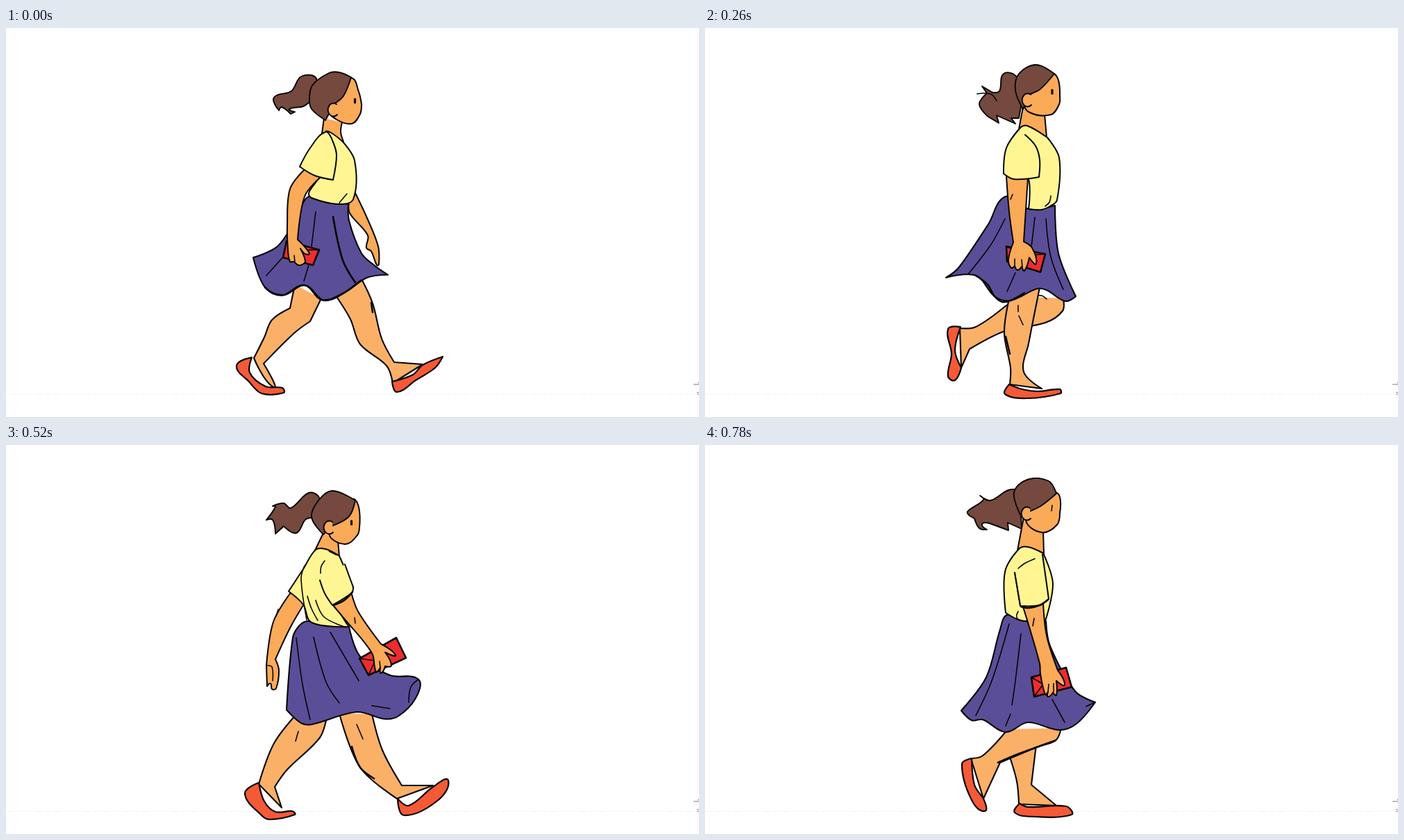
Write an HTML page that moves like this. It is 998 px wide and 561 px high and loops after 0.91 s.

```html
<!DOCTYPE html>
<html lang="en">
<head>
<meta charset="utf-8">
<title>Walk cycle</title>
<style>
  html, body { margin: 0; width: 100%; height: 100%; overflow: hidden; background: #fff; }
  svg { display: block; width: 100vw; height: 100vh; }
  path { stroke: #050505; stroke-linecap: round; stroke-linejoin: round; }
</style>
</head>
<body>
<svg id="stage" viewBox="0 0 998 561">
  <path d="M0 528.5H998" style="stroke:#f3f3f3;stroke-width:1;stroke-dasharray:9 5"/>
  <path d="M990.5 514H998M997 511.5h1M995.5 525.5h1.5M996 528h2" style="stroke:#777;stroke-width:1"/>
</svg>
<script>
const STEP = 130;
const SKIN = '#fbaa57';
let markup = '';

function path(d, fill, width) {
  markup += `<path d="${d}" fill="${fill}" stroke-width="${width}"/>`;
}

// Smooth curve through the points; "!" marks a sharp corner.
function curve(text, closed) {
  const pts = text.split(' ').map(p => {
    const [x, y] = p.split(',').map(parseFloat);
    return { x, y, sharp: p.endsWith('!') };
  });
  const n = pts.length, at = i => pts[(i + n) % n];
  const heading = i => {
    const loose = !closed && (i === 0 || i === n - 1);
    if (loose || at(i).sharp) return [0, 0];
    const dx = at(i + 1).x - at(i - 1).x, dy = at(i + 1).y - at(i - 1).y;
    const len = Math.hypot(dx, dy) || 1;
    return [dx / len, dy / len];
  };
  let d = `M${pts[0].x} ${pts[0].y}`;
  for (let i = 0; i < (closed ? n : n - 1); i++) {
    const a = at(i), b = at(i + 1), [ax, ay] = heading(i), [bx, by] = heading((i + 1) % n);
    const r = Math.hypot(b.x - a.x, b.y - a.y) / 3;
    d += `C${a.x + ax * r} ${a.y + ay * r} ${b.x - bx * r} ${b.y - by * r} ${b.x} ${b.y}`;
  }
  return closed ? d + 'Z' : d;
}

const pen = (fill, width, closed) => text => path(curve(text, closed), fill, width);
const face = pen(SKIN, 2, true);
const limb = pen(SKIN, 2, false);
const leg = pen('#fbb068', 2.1, false);
const hair = pen('#75493d', 1.9, true);
const shirt = pen('#fff693', 2, true);
const sleeve = pen('#fff693', 2, false);
const skirt = pen('#5b4e98', 2.1, true);
const shoe = pen('#f65936', 2.2, true);
const line = pen('none', 1.6, false);
const bold = pen('none', 2.6, false);

const ear = (x, y) => path(`M${x + 5} ${y - 8}A8 9.5 0 1 0 ${x + 6} ${y + 7}`, SKIN, 2);
const eye = (x, y) => path(`M${x} ${y - 2.5}v5`, 'none', 3.2);

// Corners run top left, top right, bottom right, bottom left; the flap folds in from the left.
function purse(ax, ay, bx, by, cx, cy, dx, dy) {
  const mx = (ax + dx) / 2 + (bx - ax) * 0.3, my = (ay + dy) / 2 + (by - ay) * 0.3;
  path(`M${ax} ${ay}L${bx} ${by}L${cx} ${cy}L${dx} ${dy}Z`, '#ee2c30', 2.6);
  path(`M${ax} ${ay}L${mx} ${my}L${dx} ${dy}`, 'none', 1.6);
}

function contactNear() {
  limb('502,236 520,274 536,315 537,341 534,342 526,322 519,317 521,299 495,267 494,250');
  leg('416,370 409,404! 383,421 372,446 357,476! 385,518 371,484! 415,440 438,423! 454,390');
  shoe('332,487 354,475! 351,497 374,517 398,519 400,526 368,527 350,510');
  leg('475,386 496,420 510,456 548,487 557,512! 600,485! 559,482! 541,448 528,397 511,360');
  bold('526,396 528,410');
  shoe('629,474! 618,490 590,508 563,525 556,510! 586,500 600,486');
  skirt('436,243 460,250 493,254! 494,278 512,325 530,342 550,356! 520,360 490,380 455,392 430,371 400,385 373,374 356,331! 392,314 420,270');
  bold('373,374 385,383 400,385 430,371 455,392 470,391 490,380 511,364');
  line('446,265 440,315');
  line('436,342 429,365');
  bold('471,272 485,335 503,367');
  line('401,328 375,357');
  limb('458,130 455,152! 486,164! 482,150 484,136');
  shirt('460,150 468,151 485,164! 502,191 500,247 478,254 440,245 436,238 450,215');
  line('480,252 491,239');
  purse(451, 320, 442, 342, 399, 331, 404, 307);
  limb('430,204 409,232 405,285 406,320 409,337 414,337 421,342 427,341 431,336 424,318! 431,326 437,325 420,305! 430,243 452,216');
  line('416,337 415,328');
  sleeve('470,162 460,150 438,173 423,200! 445,213 471,219! 476,183 470,162');
  hair('447,73 425,70 411,91 390,97 385,104 393,119! 397,114 410,124! 416,121! 408,117 428,113 440,104!');
  face('497,72 508,92 512,110! 510,124 498,138 476,132 466,120 480,90');
  hair('437,105 441,83 465,65 480,64 497,71! 486,98 473,109! 460,133! 441,118');
  ear(471, 118);
  eye(502.5, 105);
}

function downNear() {
  limb('512,220 552,267 575,288 582,302 583,316 579,312 578,319 573,313 571,317 566,312 563,315 564,303 551,284 504,250');
  line('556,280 575,300 581,302');
  leg('420,386 413,393! 380,410 343,443 328,446! 331,498! 346,465! 405,438 435,428! 467,376');
  line('415,389 413,398');
  shoe('309,448 315,442 329,446! 320,478 331,498! 328,520 320,522 313,510');
  leg('503,394 513,402 517,442 543,483 548,516! 612,516! 572,495 558,475 554,405 541,366');
  bold('552,385 554,430');
  shoe('550,515! 545,527 549,533 600,530 629,522 612,518 565,521');
  skirt('430,252 465,263 502,262! 503,290 530,328 560,360 542,367 505,395 490,397 460,374 410,389 390,367 348,346 349,341 390,306');
  line('442,268 413,306');
  line('394,335 385,345');
  line('460,285 462,358');
  line('493,272 493,298');
  line('517,370 508,380 493,386');
  line('348,346 368,344');
  line('542,367 547,359 559,358');
  limb('466,138 460,168! 490,180! 494,154');
  shirt('461,166 480,179 495,184! 517,219! 509,224 503,262 465,262 437,249 450,225 440,190');
  line('505,200 508,224 493,249');
  line('450,256 461,246');
  purse(437, 322, 431, 347, 405, 338, 409, 314);
  limb('427,210 403,250 390,312 396,336 401,333! 403,341 409,341! 411,328! 421,333 421,325 409,300! 428,260 452,227');
  line('402,334 399,324');
  sleeve('468,184 461,166 437,187 425,211! 445,227 470,228! 473,190 458,180');
  hair('466,87 445,72 425,88 411,99 393,90! 394,97 388,104 400,115 403,123! 413,115! 415,125 441,122 454,116!');
  face('519,101 519,131! 515,143 502,157 480,147 470,136 490,110');
  hair('451,117 457,86 488,74 514,87 519,101 510,116 482,122! 468,139!');
  ear(477, 132);
  line('508,124 507,131');
}

function passNear() {
  leg('470,388 434,400! 390,431 367,433! 369,490! 381,463! 432,437 490,425 515,408 516,390');
  line('477,386 485,386 492,391');
  shoe('350,434 368,431! 360,465 369,490! 360,508 350,502 355,470');
  leg('438,390 431,440 440,490 439,514! 485,520! 459,496 466,455 482,374');
  bold('433,445 439,470');
  line('451,400 451,409');
  line('452,415 458,428');
  shoe('438,514! 432,528 465,534 512,527 511,521 480,524 457,521');
  skirt('433,243 466,261 504,256! 509,325 534,387! 519,394 492,378 478,376 440,393 417,387 390,357 347,360! 365,346 408,283');
  bold('390,357 407,370 417,387 428,395 440,393 460,382');
  line('432,275 412,312 379,355');
  line('475,273 470,316');
  line('447,353 435,380');
  line('491,275 498,330 516,377');
  limb('458,114 452,146! 492,158! 489,124');
  shirt('454,144 464,141 493,158! 510,187 507,248 497,257! 485,262 466,261! 466,218 440,170');
  line('490,257 496,251 498,242');
  purse(490, 326, 483, 352, 435, 337, 434, 315);
  limb('434,214 438,265 444,309! 437,334 441,346 446,343! 450,349 456,344! 460,350 467,331! 477,340 471,317 459,308! 465,216');
  line('446,343 446,333');
  line('457,345 456,334');
  line('443,240 440,247');
  sleeve('454,144 434,173 430,210! 445,218 481,215! 482,190 476,170 461,154');
  hair('449,71 430,66 424,91 414,93! 399,84! 406,94! 395,110 408,128! 423,137! 420,126! 447,138! 441,130! 452,130! 456,108!');
  line('420,105 411,95 392,95');
  face('503,66 511,97! 510,110 498,125 466,121 460,105 480,80');
  hair('447,90 452,66 477,53 503,66! 483,88 469,95! 458,117!');
  ear(464, 104);
  eye(500, 92);
}

function riseNear() {
  limb('424,216 412,238 412,275 420,265 436,245');
  line('424,236 421,244');
  leg('515,390 500,420 480,458 470,458! 493,506! 491,470! 555,418 564,403 550,368');
  line('515,388 528,398');
  shoe('471,457! 454,468 472,508 495,524 499,520 485,501');
  leg('432,378 404,440 392,500! 445,519! 420,497! 438,465 465,420 469,400');
  line('438,408 435,420');
  shoe('392,499! 384,515 383,527 464,527 466,521 440,520 417,518');
  skirt('432,248 475,264 499,262! 505,290 540,330 577,340! 570,358 553,373 505,400 462,402 425,378 381,378! 403,320 420,264');
  bold('437,384 462,402 483,406 505,400');
  line('451,268 436,325 428,364');
  line('487,267 508,306');
  line('488,354 493,388');
  line('577,340 566,349 570,358');
  limb('457,120 450,154! 491,168! 482,147 486,127');
  shirt('452,152 465,150 490,166! 505,192 501,252 485,265 448,255 428,228 416,212! 435,178');
  line('444,162 430,210 449,256');
  line('436,220 441,240 449,254');
  line('494,230 495,245 488,262');
  purse(473, 322, 530, 303, 539, 327, 482, 354);
  limb('447,227 455,268 485,312 487,326 497,348 502,343! 505,352 511,345! 516,350 522,340 513,322! 525,321 496,308! 480,255 476,227');
  line('502,343 499,334');
  line('511,345 508,334');
  line('459,258 461,268');
  sleeve('452,152 443,165 438,223! 455,230 491,221! 489,200 476,160');
  hair('438,82 421,69 405,90 390,96 379,88! 384,95 374,98! 377,115 391,133 403,135! 403,123 429,122 435,130! 441,131 437,110 442,100!');
  face('493,67 503,92 508,97! 505,115 492,129 470,121 460,105 480,80');
  hair('437,97 443,70 470,53 493,67! 487,95 471,108! 456,123!');
  ear(462, 109);
  eye(498, 97);
}

function contactFar() {
  limb('412,210 385,255 375,318! 376,348! 381,344 383,352 389,351 393,325 388,309! 410,262 430,228');
  line('376,318 383,320 384,340');
  line('392,237 389,247');
  leg('414,393 385,432 364,489! 397,523! 387,493! 405,468 452,422 462,392');
  line('421,413 417,427');
  shoe('344,503 364,487! 372,514 388,529 412,528 416,533 380,540 368,534');
  leg('480,387 510,465 563,510! 615,491! 570,491! 542,440 527,388');
  bold('498,435 510,465 530,481');
  line('505,403 514,424');
  shoe('564,510! 573,534 620,514 637,484 615,493 580,520');
  skirt('434,254 475,257 494,262! 510,305 553,332 594,338 590,365 565,391 545,395 505,385 440,403 425,401 404,382! 413,278 422,261');
  line('418,278 427,345 438,396');
  line('443,277 461,342 480,372');
  line('467,270 508,340');
  line('594,338 583,349 580,371');
  line('527,376 553,380');
  limb('457,127 444,154! 480,162! 478,137');
  shirt('446,151 460,150 480,160! 500,205! 480,232 494,262! 440,256 428,230 407,211! 428,179');
  line('430,174 425,193 433,252');
  bold('466,153 476,158');
  line('459,167 454,175 453,185');
  line('434,218 440,236 449,253');
  line('446,224 458,248 490,263');
  purse(509, 308, 562, 278, 576, 307, 522, 332);
  limb('470,230 485,248 527,300 533,327 539,321! 540,329 546,319! 555,318 546,299! 561,303 540,287! 507,240 497,212');
  line('539,321 538,312');
  line('502,249 503,257');
  sleeve('452,195 459,214 470,231! 498,213 500,205! 488,172');
  bold('472,231 487,224 499,212');
  hair('451,76 436,69 410,91 400,84 384,88! 388,89 375,108! 384,108 388,128! 400,117! 418,127 432,107 448,105!');
  face('503,79 509,119! 506,130 488,143 465,127 485,95');
  hair('450,80 470,66 503,80! 494,103 471,116! 457,129! 440,104');
  ear(465, 119);
  eye(497.5, 112);
}

function downFar() {
  limb('422,204 387,235 370,293 361,310 358,343 364,344 376,332 379,295! 405,262 428,230');
  line('370,297 372,306 369,320');
  leg('418,378 414,395! 368,425 326,448! 326,514! 345,471! 430,425 449,410');
  line('420,409 412,413');
  shoe('306,456 314,446 326,448! 319,490 327,515! 320,531 313,519');
  leg('494,388 512,405 516,455 545,495 548,507! 601,519! 562,490! 557,420 554,388');
  bold('556,395 554,425');
  line('529,404 534,414');
  line('540,425 550,425');
  shoe('549,506! 540,530 600,531 622,531 615,519 580,527');
  skirt('440,255 470,262 505,267! 525,308 570,326 602,320! 585,347 560,390 525,380 475,411 452,412 430,381 388,388 365,374! 390,350 417,280');
  line('450,266 432,297 425,320');
  line('425,331 396,376');
  line('474,280 468,335 463,391');
  line('500,276 523,362');
  line('601,326 575,332 558,330');
  line('541,377 558,377');
  limb('469,133 462,164! 491,168! 492,152');
  shirt('464,162 475,161 498,174! 518,206! 506,240 508,267! 470,261 438,248 423,222 421,205! 452,174');
  line('452,174 438,192 438,240');
  line('447,237 457,257');
  line('457,240 460,250 502,266');
  purse(580, 252, 607, 250, 605, 302, 573, 303);
  limb('512,219 580,266! 593,256 606,255 600,260 612,264! 613,273! 610,284! 588,289 578,283! 525,260 505,241');
  line('593,267 612,264');
  line('595,274 613,273');
  line('521,231 527,238');
  line('518,206 507,242 500,242');
  line('467,203 500,242');
  face('517,99 517,128! 511,148 500,154 473,144 472,130 490,105');
  hair('468,80 500,80 517,100 500,115 484,120! 469,136! 450,118 447,104');
  hair('468,80 456,70 437,83 421,76 411,73! 420,83! 397,85 391,99! 392,110! 403,121! 416,128! 412,120 443,99 462,101');
  ear(478, 127);
  eye(508.5, 125);
}

function passFar() {
  leg('437,444 449,485 452,518! 506,520! 470,490! 477,432');
  shoe('453,517! 446,530 475,536 528,533 520,521 465,522');
  leg('436,410 400,448 383,452! 401,510! 425,458! 480,435 505,426 513,408');
  bold('422,458 450,446 480,435 505,426');
  shoe('370,460 384,452! 388,490 400,508! 403,528 383,510');
  skirt('435,245 455,253 491,254! 497,290 533,355 562,371! 535,402 510,411 465,400 433,414 400,396 384,397 369,383! 405,335 425,266');
  line('438,258 413,340 390,390');
  line('455,272 447,340 442,375');
  line('440,388 433,405');
  line('500,367 518,400');
  line('562,371 549,377');
  limb('459,104 450,152! 488,158! 487,124');
  shirt('452,150 465,147 487,156! 501,200 490,254! 455,253 433,242! 432,183');
  line('451,240 449,249 458,254');
  purse(470, 335, 520, 321, 528, 349, 474, 363);
  limb('457,230 482,315 483,330 490,360 494,356! 494,363 501,357! 506,361 506,340! 518,346 508,325! 492,275 487,228');
  line('494,356 495,345');
  line('502,356 502,344');
  line('474,250 472,261');
  sleeve('446,184 454,232! 482,231 495,222! 486,158');
  line('446,184 454,232');
  bold('455,233 466,235 482,231 494,223');
  line('451,178 460,171 475,164');
  hair('450,67 437,65 411,80 396,73! 401,79 378,96 381,102! 388,106! 395,120 406,122! 399,114 410,113! 437,123! 436,112! 456,121! 455,98!');
  face('507,69 511,98! 507,115 485,126 462,108 480,80');
  hair('445,69 464,50 495,52 506,70! 485,87 469,95! 456,104!');
  ear(463, 99);
  line('500,87 499,95');
}

const stage = document.getElementById('stage');
const poses = [contactNear, downNear, passNear, riseNear, contactFar, downFar, passFar];
const loop = STEP * poses.length;

poses.forEach((pose, i) => {
  markup = '';
  pose();
  const g = document.createElementNS('http://www.w3.org/2000/svg', 'g');
  g.innerHTML = markup;
  stage.append(g);
  g.animate([
    { opacity: 1, easing: 'step-end' },
    { opacity: 0, offset: 1 / poses.length },
    { opacity: 0 }
  ], { duration: loop, delay: i * STEP - loop, iterations: Infinity });
});
</script>
</body>
</html>
```
